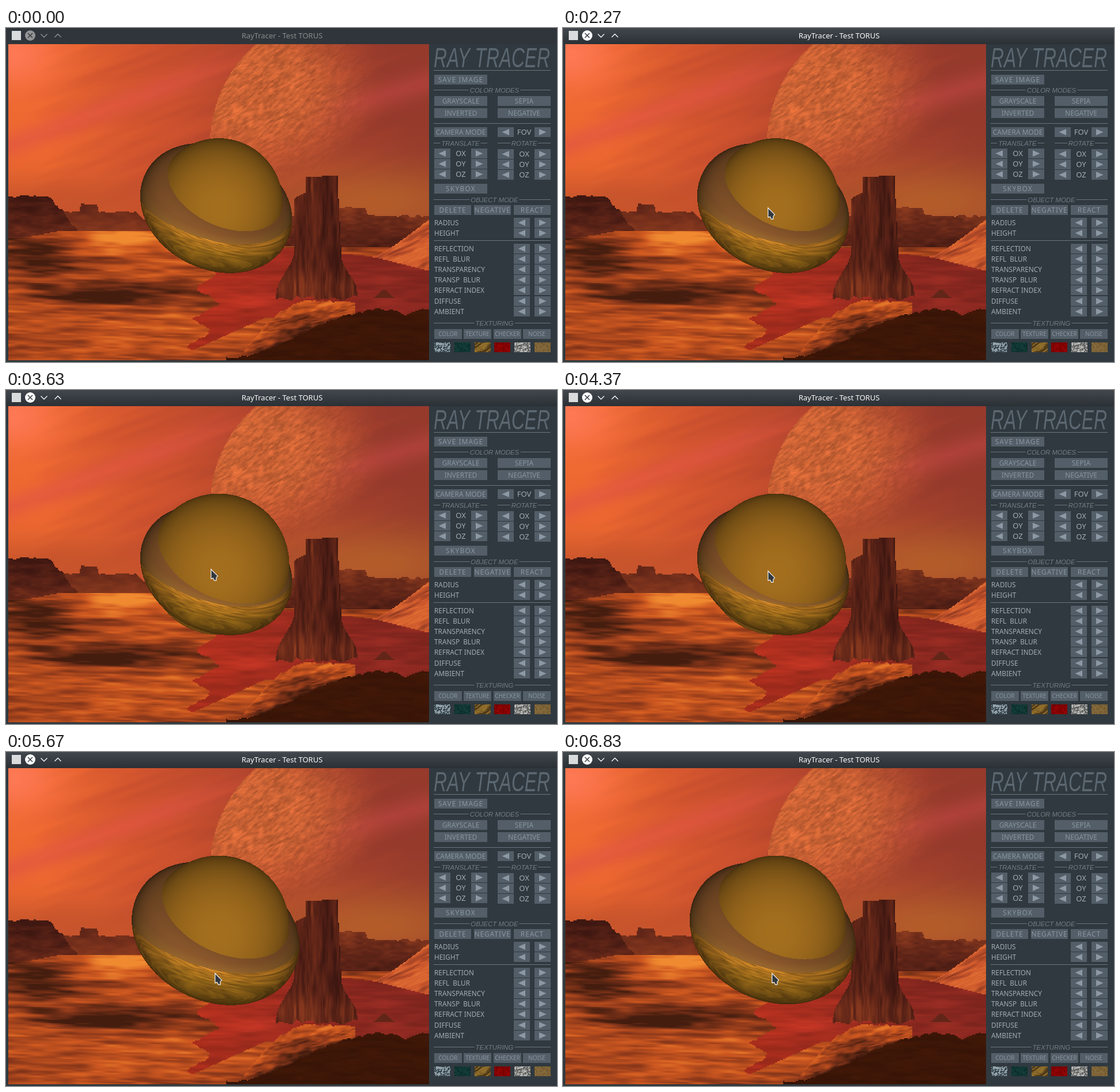
Write an HTML page with a canvas that moves like this. It is 956 px wide and 579 px high and loops after 8 s.

```html
<!DOCTYPE html>
<html lang="en">
<head>
<meta charset="utf-8">
<title>RayTracer</title>
<style>
  html, body { margin: 0; width: 100%; height: 100%; overflow: hidden; background: #30393f; }
  canvas { display: block; }
</style>
</head>
<body>
<canvas id="stage" width="956" height="579"></canvas>
<script>
const W = 956, H = 579, LOOP = 8000;
const stage = document.getElementById('stage').getContext('2d');

function makeCanvas(w, h) {
  const c = document.createElement('canvas');
  c.width = w;
  c.height = h;
  return c.getContext('2d');
}
// Fill a canvas from a function giving [r, g, b] or null at each pixel.
function shadePixels(w, h, shade) {
  const c = makeCanvas(w, h), img = c.createImageData(w, h);
  for (let j = 0, o = 0; j < h; j++) for (let i = 0; i < w; i++, o += 4) {
    const col = shade(i, j);
    if (col) img.data.set([...col, 255], o);
  }
  c.putImageData(img, 0, 0);
  return c.canvas;
}

// ---------- helpers ----------
const clamp = v => Math.max(0, Math.min(1, v));
const mix = (a, b, t) => a.map((v, i) => v + (b[i] - v) * t);
const smooth = (a, b, x) => { const t = clamp((x - a) / (b - a)); return t * t * (3 - 2 * t); };
const plateau = (a, b, slope, x) => smooth(a - slope, a, x) - smooth(b, b + slope, x);
const bell = (x, c, r) => Math.exp(-(((x - c) / r) ** 2));
const spot = (x, y, cx, cy, rx, ry) => bell(x, cx, rx) * bell(y, cy, ry);
function ramp(cols, t) {
  const u = clamp(t) * (cols.length - 1), i = Math.min(cols.length - 2, Math.floor(u));
  return mix(cols[i], cols[i + 1], u - i);
}
function hash(x, y) {
  const s = Math.sin(x * 127.1 + y * 311.7) * 43758.5453;
  return s - Math.floor(s);
}
function noise(x, y) {
  const i = Math.floor(x), j = Math.floor(y), u = smooth(0, 1, x - i), v = smooth(0, 1, y - j);
  const a = hash(i, j), b = hash(i + 1, j), c = hash(i, j + 1), d = hash(i + 1, j + 1);
  return a + (b - a) * u + (c - a + (a - b - c + d) * u) * v;
}
const fbm = (x, y) => 0.6 * noise(x, y) + 0.4 * noise(2.3 * x + 9, 2.3 * y + 5) - 0.5;

// ---------- landscape: one colour rule per part, from near to far ----------
const VIEW = { x: 4, y: 28, w: 730, h: 548 };
const SKY = [[238, 104, 48], [206, 82, 46], [172, 66, 44], [150, 58, 44]];
const EARTH = [[68, 29, 15], [140, 56, 26], [206, 88, 32], [240, 138, 48]];
const ROCK = [[62, 23, 17], [98, 38, 24], [146, 62, 32]];

function sky(x, y) {
  const wisp = fbm(x / 170, (y + 0.35 * x) / 22);
  let c = ramp(SKY, (x - 40) / 640 + 0.25 * wisp);
  c = mix(c, [255, 122, 88], 0.9 * spot(x, y, 5, 45, 80, 55));
  c = mix(c, [224, 84, 68], 0.6 * bell(y + 0.375 * x, 205, 22) * smooth(480, 250, x));
  c = mix(c, [186, 68, 64], 0.6 * bell(y + 0.3 * x, 312, 22) * smooth(500, 620, x));
  c = mix(c, [186, 78, 42], 0.7 * bell(y, 305, 50) * smooth(480, 100, x));
  c = mix(c, [184, 98, 42], 0.85 * spot(x, y, 640, 300, 190, 65));
  if (Math.hypot(x - 580, y - 200) < 227) {
    const fade = smooth(235, 60, Math.hypot(x - 430, (y - 105) * 1.25));
    const grain = 1 + 0.5 * fbm(x / 9, (y + 0.6 * x) / 4);
    c = mix(c, [208, 104, 54].map(v => v * grain), 0.85 * fade);
  }
  return c;
}
function farRidges(x, y) {
  const rough = 6 * noise(x / 7, 3), grain = 0.6 * fbm(x / 22, y / 8);
  const left = 288 + rough + 68 * smooth(66, 140, x);
  const mid = 316 + rough / 2 - 14 * plateau(130, 156, 5, x) + 14 * smooth(222, 242, x);
  const right = 321 + rough - 13 * plateau(574, 622, 6, x);
  if (x < 150 && y > left) return ramp(ROCK, (y - 290) / 130 + grain);
  if (x < 300 && y > mid) return ramp(ROCK, 0.55 + (y - 305) / 160 + grain / 2);
  if (x > 480 && y > right) return ramp(ROCK, 0.85 - (y - 310) / 110 + grain);
  return null;
}
function plain(x, y) {
  const t = 0.5 + 0.75 * fbm(x / 60, (y - 0.03 * x) / 7)
    + 0.45 * spot(x, y, 205, 368, 80, 24) - 0.4 * spot(x, y, 40, 375, 100, 18)
    - 0.4 * spot(x, y, 60, 410, 120, 16) - 0.55 * spot(x, y, 185, 460, 135, 20)
    + 0.2 * spot(x, y, 260, 515, 110, 30) + 0.12 * spot(x, y, 270, 420, 70, 20);
  return ramp(EARTH, t);
}
function lake(x, y) {
  const shore = 350 + 18 * Math.sin((y - 412) / 8) - 15 * smooth(480, 540, y) + 20 * fbm(x / 30, y / 8);
  if (x < shore || y < 382 + 0.1 * (x - 500) || y > Math.max(500, 550 - 0.45 * (x - 340))) return null;
  const shine = 1 + 0.3 * fbm(x / 60, y / 8) + 0.15 * spot(x, y, 430, 470, 60, 14);
  return mix([172, 46, 29], [138, 40, 32], clamp((x - 340) / 300)).map(v => v * shine);
}
function rightHill(x, y) {
  const u = (x - 636) / 98;
  if (u < 0 || y < 396 - 66 * u ** 1.2 || y > 396 + 24 * u) return null;
  return ramp([[120, 46, 30], [205, 88, 44], [236, 122, 56]], 0.5 + 0.9 * fbm(x / 26, (y + 0.45 * x) / 5));
}
function tower(x, y) {
  const a = 520 - 21 * smooth(282, 296, y) - 31 * smooth(385, 460, y);
  const b = 574 + 0.05 * (y - 256) + 24 * smooth(395, 455, y);
  const foot = 462 + 10 * noise(x / 9, 7);
  if (x < a || x > b || y < 258 - (x - 520) / 14 || y > foot) return null;
  return ramp(ROCK, 0.4 + 0.9 * fbm(x / 5, y / 45) - 0.22 * smooth(540, 552, x) + 0.25 * smooth(400, 450, y));
}
function shoreRocks(x, y) {
  const top = 473 + 62 * (Math.max(0, 530 - x) / 100) ** 2 + 12 * fbm(x / 14, 2);
  if (y < top || x > 604 || x < 380) return null;
  return ramp(EARTH, 0.72 - (y - top) / 75 + 0.9 * fbm(x / 24, (y + 0.2 * x) / 6));
}
function darkHill(x, y) {
  const top = 572 - 85 * smooth(375, 645, x) + 9 * bell(x, 694, 16) + 7 * fbm(x / 10, 5);
  return x > 380 && y > top ? [60, 22, 7].map(v => v * (1 + 0.3 * fbm(x / 30, y / 6))) : null;
}
const islet = (x, y) => y < 467 && y > 467 - 14 * bell(x, 655, 12) && Math.abs(x - 655) < 18 ? ROCK[1] : null;
const isPlain = (x, y) => y > 350 + 12 * smooth(110, 20, x) + 28 * smooth(330, 500, x);

function landColor(i, j) {
  const x = VIEW.x + 2 * i, y = VIEW.y + 2 * j;
  return darkHill(x, y) || tower(x, y) || shoreRocks(x, y) || islet(x, y) || rightHill(x, y)
    || lake(x, y) || (isPlain(x, y) ? plain(x, y) : farRidges(x, y) || sky(x, y));
}

// ---------- ray traced sphere and torus ----------
const EYE = 600, TILT = 25 * Math.PI / 180, FACE = 0.66, SIDE = Math.sqrt(1 - FACE * FACE);
const AXIS = [SIDE * Math.sin(TILT), -SIDE * Math.cos(TILT), FACE];
const BOX = { x: 193, y: 170, w: 354, h: 294 }, MID = { x: 369, y: 302 };
const BALL = 109, RING = 88, TUBE = 45.8;
const OCHRE = [163, 110, 30];

function torusHit(d, R, r) {
  for (let t = EYE - 185, i = 0; i < 70 && t < EYE + 185; i++) {
    const x = d[0] * t, y = d[1] * t, z = EYE + d[2] * t;
    const h = x * AXIS[0] + y * AXIS[1] + z * AXIS[2];
    const rho = Math.sqrt(x * x + y * y + z * z - h * h);
    const q = rho - R, len = Math.hypot(q, h);
    if (len - r < 0.15) {
      const n = [x, y, z].map((p, k) => ((p - h * AXIS[k]) / rho * q + AXIS[k] * h) / len);
      return { t, n };
    }
    t += len - r;
  }
  return null;
}
function sphereHit(d, S) {
  const b = EYE * d[2], disc = b * b - EYE * EYE + S * S;
  if (disc < 0) return null;
  const t = -b - Math.sqrt(disc);
  return { t, n: [d[0] * t / S, d[1] * t / S, (EYE + d[2] * t) / S] };
}
function shadeSphere(n, nv) {
  const k = 0.47 + 0.53 * nv + 0.07 * n[1];
  return OCHRE.map(c => c * k);
}
function shadeTorus(n, nv, d) {
  const rx = 2 * nv * n[0] + d[0], ry = 2 * nv * n[1] + d[1];
  const grain = 1 + 1.2 * fbm(rx * 5 + 20, ry * 17 - rx * 4 + 40);
  const mirror = ry < 0
    ? mix([142, 98, 62], [116, 66, 58], clamp(-ry * 2.2))
    : mix([214, 134, 40], [136, 96, 20], clamp(ry * 1.4)).map(c => c * grain);
  const k = 0.3 + 0.7 * nv;
  return OCHRE.map((c, i) => 0.5 * k * (c + mirror[i]));
}
function trace(S, scale) {
  return shadePixels(BOX.w, BOX.h, (i, j) => {
    const x = BOX.x + i + 0.5 - MID.x, y = BOX.y + j + 0.5 - MID.y, len = Math.hypot(x, y, EYE);
    const d = [x / len, y / len, -EYE / len];
    const ball = sphereHit(d, S), ring = torusHit(d, RING * scale, TUBE * scale);
    const hit = ball && ring ? (ball.t < ring.t ? ball : ring) : ball || ring;
    if (!hit) return null;
    const n = hit.n, nv = Math.max(0, -(n[0] * d[0] + n[1] * d[1] + n[2] * d[2]));
    return hit === ball ? shadeSphere(n, nv) : shadeTorus(n, nv, d);
  });
}

// ---------- side panel ----------
const SANS = '"Noto Sans", "Open Sans", sans-serif', ITALIC = '"Liberation Sans", Arial, sans-serif';
const LEFT = 743, RIGHT = 945, HALF = 110, THIRD = 69, QUARTER = 51.4, ROW = 18.2;
const LABEL = '#a0abb4';
const back = makeCanvas(W, H);

function text(c, str, x, y, font, col, align = 'center', gap = 0) {
  c.font = font;
  c.fillStyle = col;
  c.textAlign = align;
  c.letterSpacing = gap + 'px';
  c.fillText(str, x, y);
  c.letterSpacing = '0px';
}
function box(x, y, w) {
  back.fillStyle = '#535e68';
  back.fillRect(x, y, w, 17);
}
function button(str, x, y, w, size = 12, gap = 0) {
  box(x, y, w);
  text(back, str, x + w / 2, y + 8.5 + size * 0.36, `${size}px ${SANS}`, '#8a959f', 'center', gap);
}
function buttonRow(names, y, pitch, w, size, gap) {
  names.forEach((s, i) => button(s, LEFT + Math.round(i * pitch), y, w, size, gap));
}
function arrow(x, y, dir) {
  box(x, y, 28);
  back.fillStyle = '#8c98a3';
  back.beginPath();
  back.moveTo(x + 14 + 6.5 * dir, y + 8.5);
  back.lineTo(x + 14 - 6 * dir, y + 3);
  back.lineTo(x + 14 - 6 * dir, y + 14);
  back.fill();
}
function spinner(str, x, y) {
  arrow(x, y, -1);
  arrow(x + 64, y, 1);
  text(back, str, x + 46, y + 13, `13px ${SANS}`, LABEL);
}
function setting(str, y) {
  arrow(881, y, -1);
  arrow(917, y, 1);
  text(back, str, LEFT, y + 12.5, `11.8px ${SANS}`, LABEL, 'left');
}
function rule(y, x0 = LEFT - 1, x1 = RIGHT) {
  back.fillStyle = '#68747d';
  back.fillRect(x0, y, x1 - x0, 1);
}
function heading(str, y, x0 = LEFT - 1, x1 = RIGHT) {
  const mid = (x0 + x1) / 2 + (x1 - x0 > 150 ? 4 : 0);
  text(back, str, mid, y + 5, `italic 11.4px ${ITALIC}`, '#717d87');
  const half = Math.round(back.measureText(str).width / 2 + 2);
  rule(y, x0, mid - half);
  rule(y, mid + half, x1);
}
function swatch(i, dark, light, size, slant = 0) {
  const img = shadePixels(28, 17, (u, v) => {
    const n = noise((u + slant * v) / size + i * 50, (v + slant * u / 4) / size) + 0.4 * (hash(u, v + i) - 0.5);
    return mix(dark, light, smooth(0.3, 0.7, n));
  });
  back.drawImage(img, LEFT + Math.round(i * 34.8), 545);
}
function paintPanel() {
  back.fillStyle = '#30393f';
  back.fillRect(0, 0, W, H);
  // narrow face for the big heading
  back.save();
  back.translate(LEFT - 1, 68);
  back.scale(0.66, 1);
  text(back, 'RAY TRACER', 0, 0, `italic 48px ${ITALIC}`, '#5b6771', 'left');
  back.restore();

  rule(73);
  button('SAVE IMAGE', LEFT, 81, 92, 12, 1);
  heading('COLOR MODES', 107);
  buttonRow(['GRAYSCALE', 'SEPIA'], 118, HALF, 92);
  buttonRow(['INVERTED', 'NEGATIVE'], 139, HALF, 92);
  rule(165);
  button('CAMERA MODE', LEFT, 172, 92);
  spinner('FOV', LEFT + HALF, 172);
  heading('TRANSLATE', 199, LEFT - 1, 835);
  heading('ROTATE', 199, LEFT + HALF, RIGHT);
  ['OX', 'OY', 'OZ'].forEach((s, i) => {
    const y = Math.floor(209 + ROW * i);
    spinner(s, LEFT, y);
    spinner(s, LEFT + HALF, y + 1);
  });
  button('SKYBOX', LEFT, 270, 92, 12, 1.2);
  heading('OBJECT MODE', 297);
  buttonRow(['DELETE', 'NEGATIVE', 'REACT'], 307, THIRD, 64, 12, 0.9);
  ['RADIUS', 'HEIGHT'].forEach((s, i) => setting(s, Math.round(329 + ROW * i)));
  rule(368);
  ['REFLECTION', 'REFL  BLUR', 'TRANSPARENCY', 'TRANSP  BLUR', 'REFRACT INDEX', 'DIFFUSE', 'AMBIENT']
    .forEach((s, i) => setting(s, Math.round(373.5 + ROW * i)));
  heading('TEXTURING', 511);
  buttonRow(['COLOR', 'TEXTURE', 'CHECKER', 'NOISE'], 522, QUARTER, 48, 10);

  swatch(0, [48, 64, 72], [150, 164, 172], 1.7);
  swatch(1, [12, 46, 44], [20, 62, 56], 1.5);
  swatch(2, [80, 58, 24], [146, 112, 44], 4, 1.2);
  swatch(3, [116, 0, 0], [150, 4, 4], 1.6);
  swatch(4, [96, 96, 96], [186, 186, 182], 1.4);
  swatch(5, [114, 90, 48], [136, 108, 62], 1.5);
}

// ---------- window and pointer ----------
const ARROW = new Path2D('M.7 .8V17.2L4.3 16.2L6.6 20.3H9.6L9.8 15.2L12.3 12.4Z');

function chevron(x, y, dir, col) {
  stage.strokeStyle = col;
  stage.lineWidth = 1.3;
  stage.beginPath();
  stage.moveTo(x - 5.5, y - 2.75 * dir);
  stage.lineTo(x, y + 2.75 * dir);
  stage.lineTo(x + 5.5, y - 2.75 * dir);
  stage.stroke();
}
function titleBar(active) {
  const tone = lo => `rgb(${mix([lo, lo + 1, lo + 2], [250, 251, 252], active).map(Math.round)})`;
  stage.fillStyle = '#2f353a';
  stage.fillRect(0, 0, W, 28);
  const f = stage.createLinearGradient(0, 0, 0, 28);
  f.addColorStop(0, '#41474d');
  f.addColorStop(1, '#2b3035');
  stage.globalAlpha = active;
  stage.fillStyle = f;
  stage.fillRect(0, 0, W, 28);
  stage.globalAlpha = 1;
  stage.fillStyle = '#d9dbdc';
  stage.fillRect(10, 5, 16, 16);
  stage.fillStyle = tone(146);
  stage.beginPath();
  stage.arc(42, 13, 9, 0, 7);
  stage.fill();
  stage.strokeStyle = '#30353a';
  stage.lineWidth = 1.4;
  stage.stroke(new Path2D('M38 9l8 8m0-8l-8 8'));
  chevron(66, 13.25, 1, tone(146));
  chevron(90, 13.25, -1, tone(146));
  text(stage, 'RayTracer - Test TORUS', 479, 18, `13px ${SANS}`, tone(138));
}
function pointer([x, y]) {
  stage.save();
  stage.translate(x, y);
  stage.fillStyle = '#31383d';
  stage.fill(ARROW);
  stage.strokeStyle = '#f4f4f4';
  stage.lineWidth = 1.2;
  stage.stroke(ARROW);
  stage.restore();
}

// ---------- timeline ----------
// Index of the current step, counted from 0, for n steps spread over a..b.
const step = (t, a, b, n) => Math.min(n - 1, Math.floor((t - a) / (b - a) * (n - 1) + 1e-6));

function pointerAt(t) {
  if (t < 700) return null;
  if (t < 2270) {
    const u = step(t, 700, 830, 5) / 4, v = 1 - u;
    return [v * v * 720 + 2 * u * v * 655 + u * u * 597, 2 * u * v * 180 + u * u * 132].map(Math.round);
  }
  if (t < 2630) return [355, 311];
  if (t < 4330) return [355, 310];
  const e = smooth(0, 8, step(t, 4330, 4630, 8) + 1);
  return [355 + 7 * e, 310 + 73 * e].map(Math.round);
}

paintPanel();
back.imageSmoothingEnabled = false;
back.drawImage(shadePixels(VIEW.w / 2, VIEW.h / 2, landColor), VIEW.x, VIEW.y, VIEW.w, VIEW.h);
back.fillStyle = '#ffb06a70';
for (let i = 0; i < 8; i++) back.fillRect(Math.round(15 + 7 * Math.cos(i * 0.8)), Math.round(45 + 7 * Math.sin(i * 0.8)), 1, 1);

// Each press changes one radius by a tenth.
const poses = [
  { at: 0, ball: 1, ring: 1 },
  { at: 3630, ball: 1.1, ring: 1 },
  { at: 5670, ball: 1.1, ring: 1.1 },
  { at: 6200, ball: 1.1, ring: 1.1 * 1.1 },
  { at: 6830, ball: 1.1, ring: 1.1 * 1.1 * 0.9 }
];
for (const p of poses) p.img = trace(BALL * p.ball, p.ring);

function draw(t) {
  stage.drawImage(back.canvas, 0, 0);
  const pose = poses.filter(p => p.at <= t).pop();
  stage.drawImage(pose.img, BOX.x, BOX.y);
  titleBar(t < 370 ? 0 : (step(t, 370, 500, 5) + 1) / 5);
  const at = pointerAt(t);
  if (at) pointer(at);
}
function tick() {
  draw(performance.now() % LOOP);
  requestAnimationFrame(tick);
}
tick();
</script>
</body>
</html>
```
